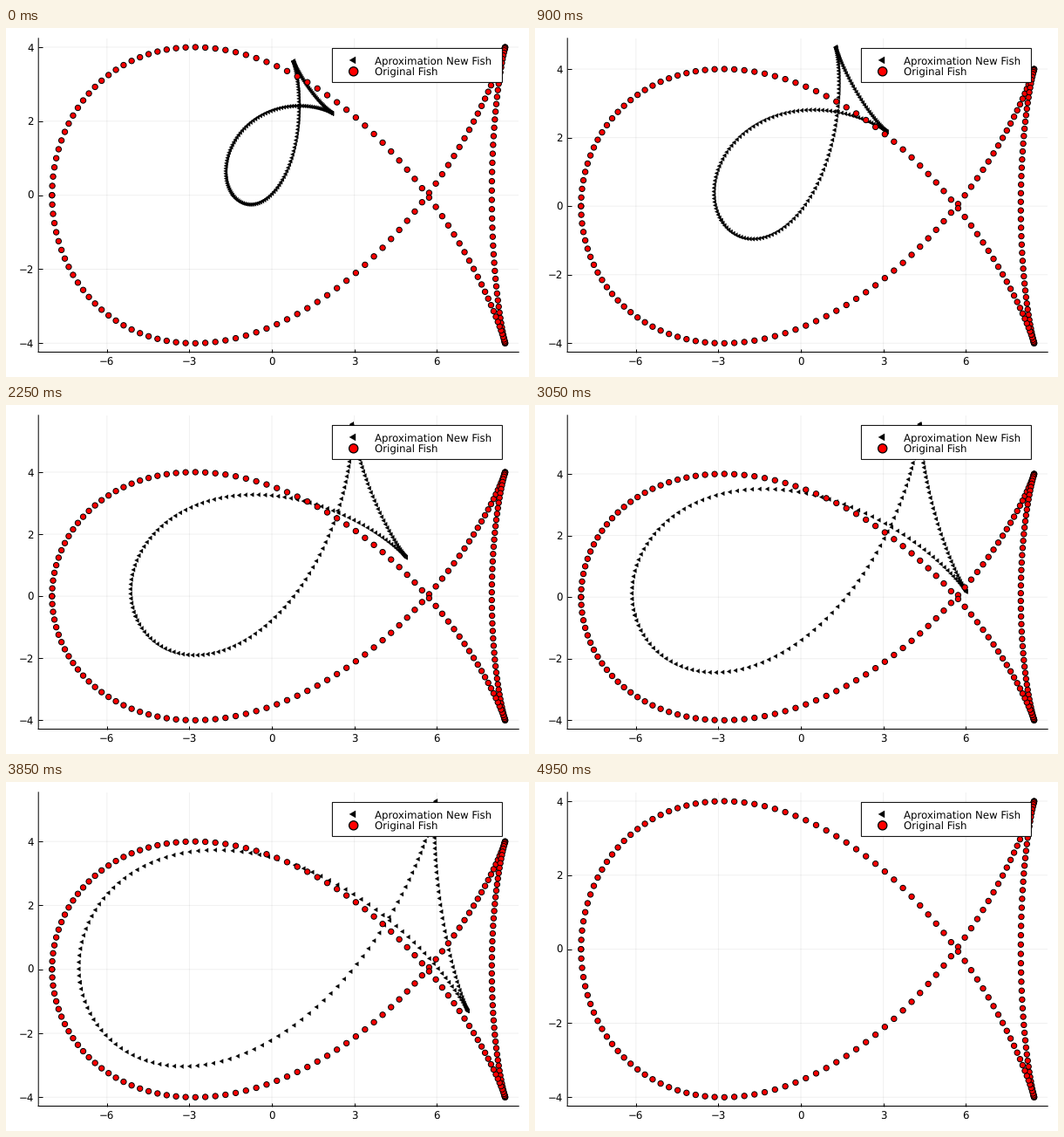
A matplotlib script that plays this animation: 600 by 400 pixels, repeating every 5000 ms.

```python
import numpy as np
import matplotlib.pyplot as plt
from matplotlib.animation import FuncAnimation
from matplotlib.patches import Rectangle

W, H, DPI = 600, 400, 100
PX = 72 / DPI                # one pixel in points
FRAMES, INTERVAL = 100, 50
LEFT, RIGHT, TOP, BOTTOM = 37.2, 588.2, 11.8, 371.5
FONT = 11.8 * PX
PAD = 0.03
TRIANGLE = [(-1, 0), (0.5, 0.866), (0.5, -0.866), (-1, 0)]

plt.rcParams["font.family"] = "DejaVu Sans"
plt.rcParams["text.hinting"] = "none"


def rotate(points, angle):
    c, s = np.cos(angle), np.sin(angle)
    return points @ np.array([[c, s], [-s, c]])


def fish(a=8, n=200):
    t = np.linspace(0, 2 * np.pi, n)
    x = a * np.sin(t) ** 2 / np.sqrt(2) - a * np.cos(t)
    return np.column_stack([x, -a * np.cos(t) * np.sin(t)])


def padded(values):
    lo, hi = values.min(), values.max()
    gap = PAD * (hi - lo)
    return lo - gap, hi + gap


def markers(axes, points, shape, size, color, edge):
    """Scatter with sizes in pixels; per-point widths keep subpixel positions."""
    return axes.scatter(points[:, 0], points[:, 1], s=(size * PX) ** 2,
                        marker=shape, facecolors=color, edgecolors="black",
                        linewidths=[edge * PX] * max(2, len(points)), zorder=3)


target = fish()
start = rotate(0.25 * (target + 4), np.pi / 4)


def approximation(u):
    """Undo the scaling, turning and shift of the small fish by a share u."""
    return (1 + 3 * u) * rotate(start, -u * np.pi / 4) - 4 * u


fig = plt.figure(figsize=(W / DPI, H / DPI), dpi=DPI, facecolor="white")
ax = fig.add_axes([LEFT / W, 1 - BOTTOM / H, (RIGHT - LEFT) / W, (BOTTOM - TOP) / H])
ax.spines[["top", "right"]].set_visible(False)
for side in ("left", "bottom"):
    ax.spines[side].set_linewidth(PX)
    ax.spines[side].set_snap(False)
ax.set_axisbelow(True)
ax.grid(color="black", alpha=0.06, linewidth=PX, snap=False)
ax.tick_params(direction="in", length=4.5 * PX, width=PX, labelsize=FONT)
ax.tick_params(axis="x", pad=6.5 * PX)
ax.tick_params(axis="y", pad=5.4 * PX)

small = markers(ax, start, TRIANGLE, 5.6, "black", 0.3)
markers(ax, target, "o", 6.3, "red", 1)
ax.set_xticks(range(-6, 7, 3))
ax.set_yticks(range(-4, 5, 2))
ax.set_xlim(padded(target[:, 0]))

# Legend, laid out in pixels
key = fig.add_axes([0, 0, 1, 1], zorder=5)
key.axis("off")
key.add_patch(Rectangle((374.4, 23.4), 195, 39, facecolor="white",
                        edgecolor="black", linewidth=PX, snap=False))
markers(key, np.array([[398.7, 36.9]]), TRIANGLE, 9.3, "black", 0.3)
markers(key, np.array([[398.7, 49.8]]), "o", 10.2, "red", 1.3)
for y, label in ((41, "Aproximation New Fish"), (54, "Original Fish")):
    key.text(422.8, y, label, fontsize=FONT, va="baseline")
key.set_xlim(0, W)
key.set_ylim(H, 0)


def update(i):
    points = approximation(i / (FRAMES - 1))
    small.set_offsets(points)
    ax.set_ylim(padded(np.concatenate([points[:, 1], target[:, 1]])))
    return [small]


anim = FuncAnimation(fig, update, frames=FRAMES, interval=INTERVAL,
                     repeat=True, repeat_delay=0, blit=False)
plt.show()
```
